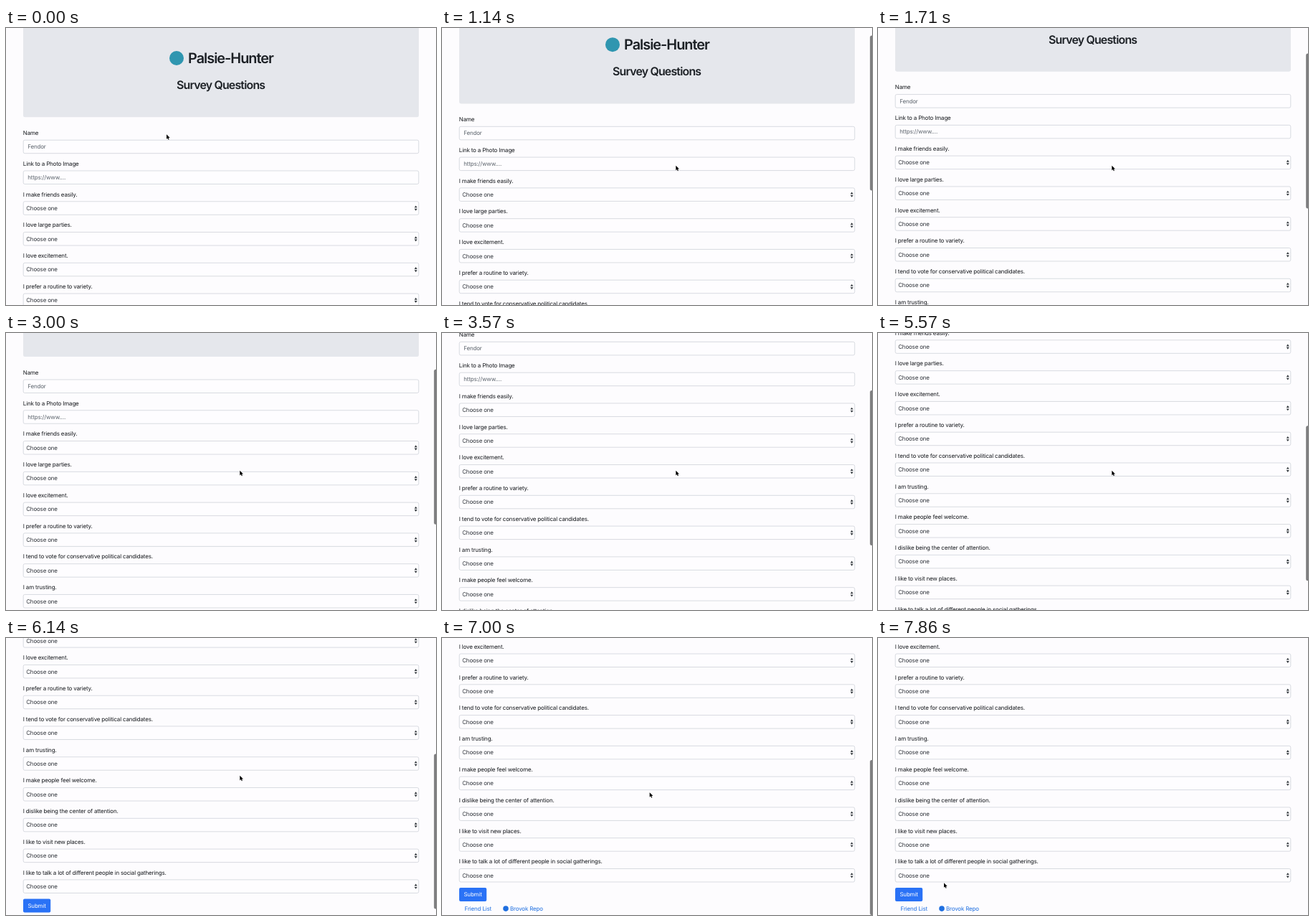
An HTML page for the animation above (8000 ms loop, 600 by 386 pixels).

```html
<!DOCTYPE html>
<html lang="en">
<head>
<meta charset="utf-8">
<title>Survey</title>
<style>
html, body { margin: 0; width: 100%; height: 100%; overflow: hidden; background: #fdfcfe; }
svg { display: block; width: 600px; height: 386px; }
text {
  font: 7.96px Inter, "Open Sans", sans-serif;
  letter-spacing: -.02em;
  fill: #15181c;
  text-rendering: geometricPrecision;
}
.title, .sub { font-weight: 600; letter-spacing: -.051em; fill: #1c2025; }
.title { font-size: 19.9px; }
.sub { font-size: 15.92px; text-anchor: middle; }
.hint { fill: #5b636b; }
.value { fill: #30353b; }
.link { fill: #1f6fe0; }
.btn { fill: #fff; text-anchor: middle; }
.field { fill: #fefdff; stroke: #c4cad1; stroke-width: .65; }
</style>
</head>
<body>
<svg viewBox="0 0 600 386">
  <g id="page">
    <rect x="24" y="-6" width="552" height="130.3" rx="2.4" fill="#e5e7ec"/>
    <circle cx="238" cy="42" r="10" fill="#2f96b0"/>
    <text class="title" x="254" y="49.2">Palsie-Hunter</text>
    <text class="sub" x="299.6" y="85.2">Survey Questions</text>
    <g id="rows"></g>
    <rect x="24" y="653.4" width="38.2" height="18.9" rx="2" fill="#2a72f6"/>
    <text class="btn" x="43" y="665.8">Submit</text>
    <text class="link" x="31.6" y="685.3">Friend List</text>
    <circle cx="89" cy="682.4" r="3.8" fill="#1f6fe0"/>
    <text class="link" x="95" y="685.3">Brovok Repo</text>
  </g>
  <rect id="bar" x="597.2" width="6" height="216" rx="2.5" fill="#7c7c7e"/>
  <path id="cursor" d="M0 0V6.6L1.5 5.2L2.5 7.5L3.6 7.1L2.7 4.8H4.7Z"
    fill="#000" stroke="#fff" stroke-width=".8" paint-order="stroke"/>
</svg>
<script>
const $ = id => document.getElementById(id);
const ROW = 42.78, LOOP = 8000, FPS = 7;

const labels = [
  "Name", "Link to a Photo Image", "I make friends easily.", "I love large parties.",
  "I love excitement.", "I prefer a routine to variety.",
  "I tend to vote for conservative political candidates.", "I am trusting.",
  "I make people feel welcome.", "I dislike being the center of attention.",
  "I like to visit new places.",
  "I like to talk a lot of different people in social gatherings."
];
const hints = ["Fendor", "https://www...."];

$("rows").innerHTML = labels.map((label, i) => {
  const content = i < hints.length
    ? `<text class="hint" x="30.3" y="168.3">${hints[i]}</text>`
    : `<text class="value" x="28.2" y="168.3">Choose one</text>
       <path d="M569.8 164.8h4l-2-2.9zM569.8 166.2h4l-2 2.9z" fill="#33383d"/>`;
  return `<g transform="translate(0 ${i * ROW})">
    <text x="23.8" y="149">${label}</text>
    <rect class="field" x="24.2" y="156.2" width="551.6" height="18.5" rx="2"/>
    ${content}</g>`;
}).join("");

// Smooth 0 to 1 over `length` steps, seven steps per second
function ease(n, start, length) {
  const p = Math.min(1, Math.max(0, (n - start) / length));
  return p * p * (3 - 2 * p);
}

function draw() {
  const t = performance.now() % LOOP;
  // Small lead keeps rounded step times on the right side
  const n = Math.min(55, Math.floor((t + 5) * FPS / 1000));

  // Four swipes down the page
  const y = 72.8 * ease(n, 5, 9) + 71 * ease(n, 19, 6)
    + 83.8 * ease(n, 28, 7) + 77.7 * ease(n, 38, 7);
  $("page").setAttribute("transform", `translate(0 ${-y})`);
  $("bar").setAttribute("y", y * .557);
  $("bar").setAttribute("opacity", ease(n, 4, 2) - ease(n, 49, 4));

  // The pointer moves in, rests, then heads for the button
  const enter = ease(n, 0, 6), leave = ease(n, 47, 8);
  const px = 224 + 102.3 * enter - 234.3 * leave;
  const py = 148.2 + 43.6 * enter + 149.4 * leave;
  $("cursor").setAttribute("transform", `translate(${px} ${py})`);
  requestAnimationFrame(draw);
}
draw();
</script>
</body>
</html>
```
